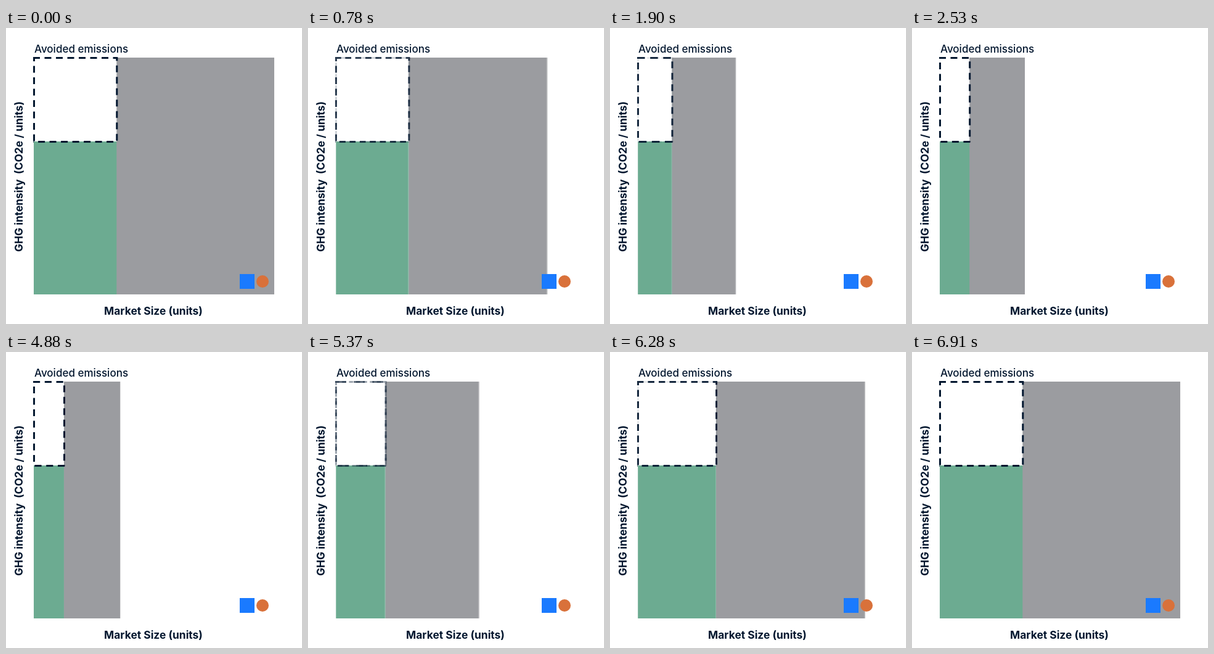
Animation, 480 px wide and 480 px high, one loop 8000 ms. Source, as an HTML page:

```html
<!DOCTYPE html>
<html lang="en">
<head>
<meta charset="utf-8">
<title>Avoided emissions</title>
<style>
  html, body { margin: 0; width: 100%; height: 100%; overflow: hidden; background: #fff; }
  svg { display: block; width: 100%; height: 100%; }
  text { font-family: Inter, sans-serif; fill: #03172f; }
  .axis { font-size: 17.4px; font-weight: 700; text-anchor: middle; white-space: pre; }
  .label { font-size: 17px; font-weight: 500; }
  .outline { stroke: #03172f; stroke-width: 3; stroke-dasharray: 11 7.5; }
  .fringe { fill: #fff; fill-opacity: .35; }
</style>
</head>
<body>
<svg viewBox="0 0 480 480">
  <rect id="market" x="45" y="48" height="384" fill="#9b9ca0"/>
  <rect id="share" x="45" y="184" height="248" fill="#6cab91"/>
  <rect id="avoided" x="45" y="48" height="136" fill="#fff"/>
  <g id="fringes" class="fringe">
    <rect x="45" y="184" width="1" height="248"/>
    <rect id="shareEdge" y="184" width="1" height="248"/>
    <rect id="marketEdge" y="48" width="1.5" height="384"/>
  </g>
  <g id="wideOutline" class="outline"></g>
  <g id="narrowOutline" class="outline"></g>
  <rect x="379" y="399" width="24" height="24" fill="#1a7aff"/>
  <circle cx="416" cy="411" r="10" fill="#d9713a"/>
  <text class="label" x="46" y="40">Avoided emissions</text>
  <text class="axis" x="239" y="465">Market Size (units)</text>
  <text class="axis" transform="translate(26.5 241) rotate(-90)">GHG intensity  (CO2e / units)</text>
</svg>
<script>
const LOOP = 8000, STEP = 70, DURATION = 2100;
const SHRINK_AT = 430, GROW_AT = 4810;
const LEFT = 45, TOP = 48.5, BOTTOM = 184.5, HALF = 1.5;
const WIDE = { market: 390, share: 134.3 };
const NARROW = { market: 138, share: 48.2 };

const byId = id => document.getElementById(id);
const set = (node, attrs) => {
  for (const key in attrs) node.setAttribute(key, attrs[key]);
};
const mix = (a, b, k) => a + (b - a) * k;

// Cubic Bezier easing (0.2, 0, 0.36, 1), solved by bisection.
function ease(x) {
  if (x <= 0 || x >= 1) return x <= 0 ? 0 : 1;
  let low = 0, high = 1, s;
  for (let i = 0; i < 24; i++) {
    s = (low + high) / 2;
    const r = 1 - s;
    if (3 * r * r * s * 0.2 + 3 * r * s * s * 0.36 + s ** 3 < x) low = s;
    else high = s;
  }
  return s * s * (3 - 2 * s);
}

const progress = (time, start) =>
  ease(Math.floor((time - start) / STEP) * STEP / DURATION);

// The dashes are laid out for one width, then stretched with the box.
function makeOutline(group, width) {
  const height = BOTTOM - TOP, long = width + 2 * HALF;
  const lengths = [long, height, long, height];
  const starts = [0, width + HALF, width + height, 2 * width + height + HALF];
  const lines = lengths.map((length, i) => {
    const line = document.createElementNS('http://www.w3.org/2000/svg', 'line');
    set(line, { pathLength: length, 'stroke-dashoffset': starts[i] });
    return group.appendChild(line);
  });
  return (boxWidth, opacity) => {
    const left = LEFT + 0.5, right = left + boxWidth;
    const sides = [
      [left - HALF, TOP, right + HALF, TOP],
      [right, TOP, right, BOTTOM],
      [right + HALF, BOTTOM, left - HALF, BOTTOM],
      [left, BOTTOM, left, TOP]
    ];
    sides.forEach(([x1, y1, x2, y2], i) => set(lines[i], { x1, y1, x2, y2 }));
    set(group, { opacity });
  };
}

const drawWide = makeOutline(byId('wideOutline'), WIDE.share);
const drawNarrow = makeOutline(byId('narrowOutline'), NARROW.share);

function draw(time) {
  const shrink = progress(time, SHRINK_AT) - progress(time, GROW_AT);
  const market = mix(WIDE.market, NARROW.market, shrink);
  const share = mix(WIDE.share, NARROW.share, shrink);
  set(byId('market'), { width: market });
  set(byId('share'), { width: share });
  set(byId('avoided'), { width: share });
  set(byId('shareEdge'), { x: LEFT + share - 1 });
  set(byId('marketEdge'), { x: LEFT + market - 1.5 });
  set(byId('fringes'), { opacity: Math.min(1, 8 * shrink * (1 - shrink)) });
  drawWide(share, 1 - shrink);
  drawNarrow(share, shrink);
}

const origin = performance.now();
function tick() {
  draw((performance.now() - origin) % LOOP);
  requestAnimationFrame(tick);
}
tick();
</script>
</body>
</html>
```
